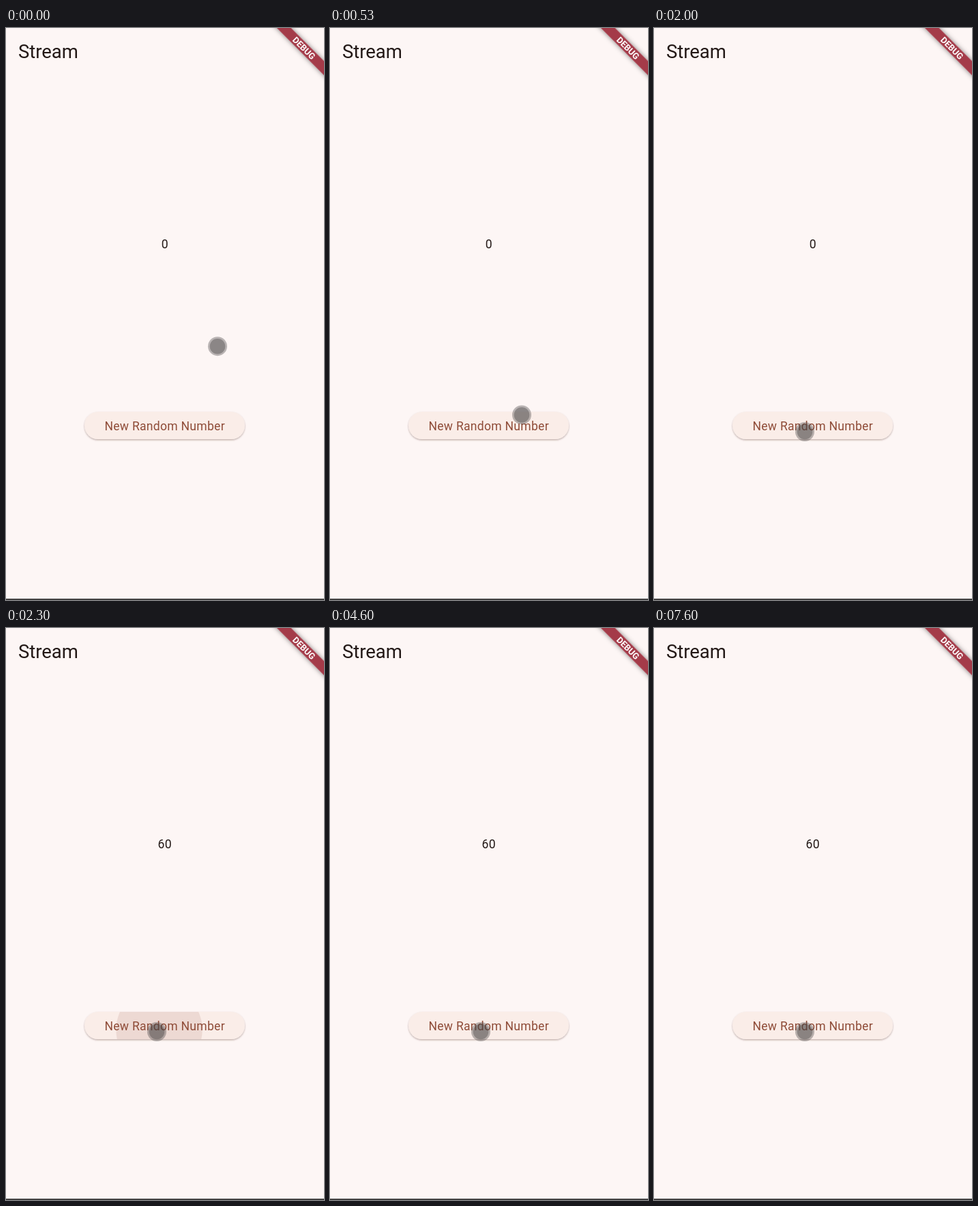
Write an HTML page that moves like this. It is 466x836 px and loops after 8000 ms.

```html
<!DOCTYPE html>
<html lang="en">
<head>
<meta charset="utf-8">
<title>Stream</title>
<style>
  html, body { margin: 0; width: 100%; height: 100%; overflow: hidden; background: #fdf6f5; }
  svg { display: block; width: 466px; height: 836px; font-family: Roboto, sans-serif; }
  .centered { text-anchor: middle; }
</style>
</head>
<body>
<svg viewBox="0 0 466 836">
  <defs>
    <filter id="buttonShadow" x="-10%" y="-30%" width="120%" height="170%">
      <feDropShadow dx="0" dy="1.3" stdDeviation="1" flood-color="#5c3a30" flood-opacity=".4"/>
    </filter>
    <filter id="bannerShadow" x="-10%" y="-80%" width="120%" height="260%">
      <feDropShadow dx="0" dy="0" stdDeviation="3.5" flood-color="#000" flood-opacity=".5"/>
    </filter>
    <clipPath id="buttonShape"><rect x="115" y="561" width="235" height="40" rx="20"/></clipPath>
  </defs>

  <rect width="466" height="836" fill="#fdf6f5"/>
  <text x="17.9" y="43.5" font-size="27.5" fill="#231917">Stream</text>
  <text id="number" class="centered" x="232.7" y="322" font-size="17.5" letter-spacing=".3" fill="#231917">0</text>

  <rect x="115" y="561" width="235" height="40" rx="20" fill="#faede8" filter="url(#buttonShadow)"/>
  <g clip-path="url(#buttonShape)"><circle id="ripple" r="0" fill="#8f4c38"/></g>
  <text class="centered" x="232.7" y="588" font-size="17.5" letter-spacing=".3" fill="#8f4c38">New Random Number</text>

  <g transform="translate(466 0) rotate(45)">
    <rect x="-60" y="34.2" width="120" height="14.6" fill="#a43a48" filter="url(#bannerShadow)"/>
    <text class="centered" x="0" y="46" font-size="12.75" font-weight="700" fill="#fff">DEBUG</text>
  </g>

  <rect y="834" width="466" height="2" fill="#454343"/>
  <g id="pointer">
    <circle r="14" fill="#4a4646" fill-opacity=".38"/>
    <circle r="11.3" fill="#3a3838" fill-opacity=".36"/>
  </g>
</svg>
<script>
  const LOOP = 8000, PRESS = 2200, RELEASE = 2270, RIPPLE_END = 2600;
  const [number, ripple, pointer] =
    ['number', 'ripple', 'pointer'].map(id => document.getElementById(id));

  // Time, x, y
  const path = [[0, 310, 465], [330, 304, 530], [730, 251, 594], [870, 221, 590]];
  const clamp = v => Math.max(0, Math.min(1, v));
  const mix = (a, b, u) => a + (b - a) * u;

  // The pointer is already moving at the first point and rests at the last
  function slope(i, axis) {
    if (i === path.length - 1) return 0;
    const before = path[Math.max(0, i - 1)], after = path[i + 1];
    return (after[axis] - before[axis]) / (after[0] - before[0]);
  }

  // Smooth Hermite curve through the points
  function pathAt(time, axis) {
    const end = path.findIndex(p => p[0] > time);
    if (end < 0) return path[path.length - 1][axis];
    const a = path[end - 1], b = path[end], span = b[0] - a[0];
    const u = (time - a[0]) / span, v = 1 - u;
    return a[axis] * (1 + 2 * u) * v * v + b[axis] * u * u * (3 - 2 * u)
      + span * u * v * (slope(end - 1, axis) * v - slope(end, axis) * u);
  }

  // The ripple grows from the pointer and drifts to the middle of the button
  function drawRipple(time) {
    const u = clamp((time - PRESS) / 275), growth = u * u * (3 - 2 * u);
    ripple.setAttribute('cx', mix(221, 232.5, growth));
    ripple.setAttribute('cy', mix(590, 581, growth));
    ripple.setAttribute('r', mix(36, 125, growth));
    ripple.setAttribute('opacity',
      0.12 * clamp((time - PRESS) / 75) * clamp((RIPPLE_END - time) / 150));
  }

  function draw(time) {
    pointer.setAttribute('transform', `translate(${pathAt(time, 1)} ${pathAt(time, 2)})`);
    number.textContent = time < RELEASE ? '0' : '60';
    drawRipple(time);
  }

  const start = performance.now();
  function tick() {
    draw((performance.now() - start) % LOOP);
    requestAnimationFrame(tick);
  }
  tick();
</script>
</body>
</html>
```
